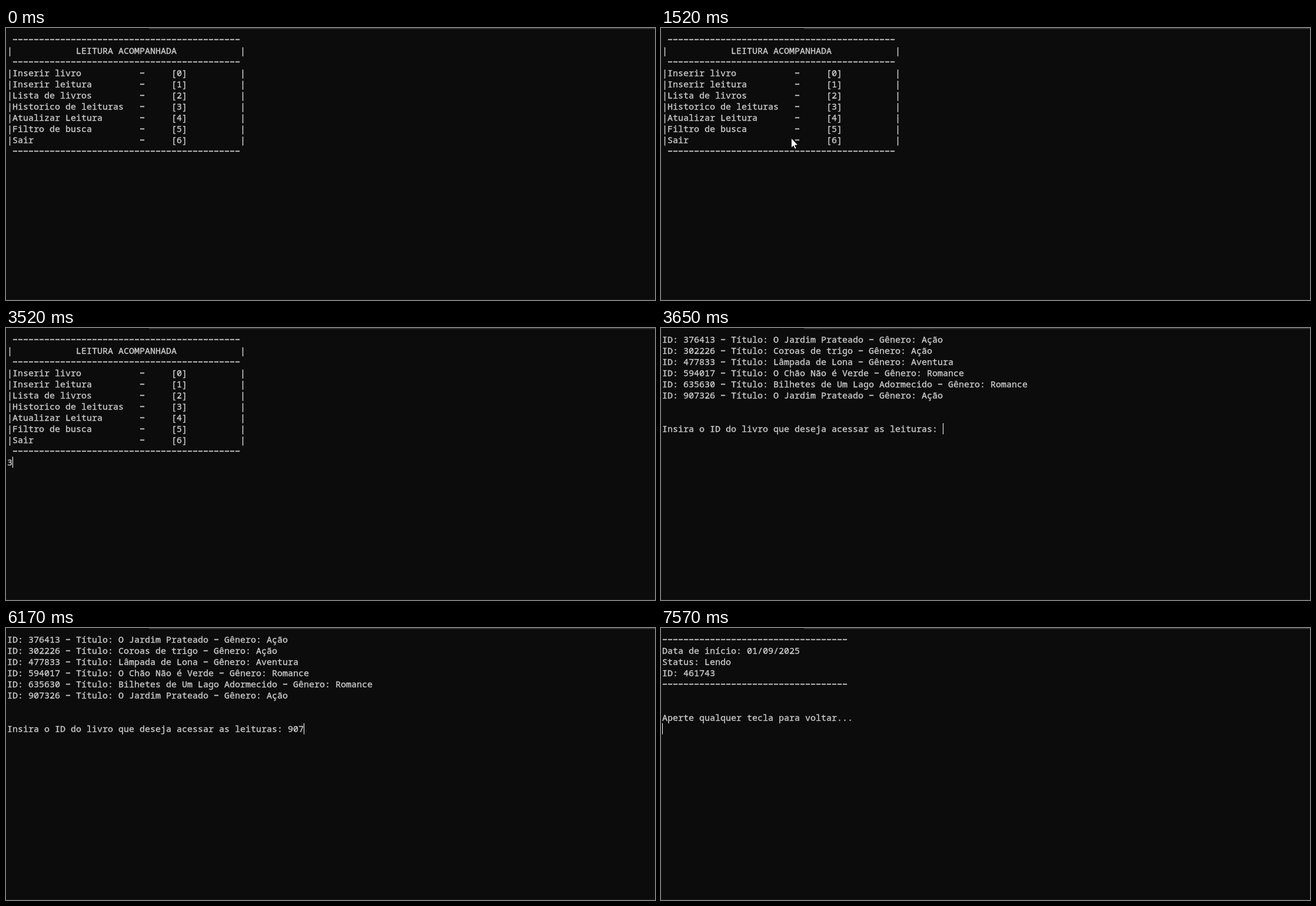
An HTML page for the animation above (8000 ms loop, 1103x463 px).

```html
<!DOCTYPE html>
<html lang="pt-BR">
<head>
<meta charset="utf-8">
<title>Leitura acompanhada</title>
<style>
html, body { margin: 0; width: 100%; height: 100%; overflow: hidden; background: #0c0c0c; }
body { position: relative; color: #ccc; }

.tab-edge { position: absolute; left: 243px; right: 0; top: 0; height: 2px; background: #2e2e2e; }
.bottom-edge { position: absolute; left: 0; right: 0; bottom: 0; height: 1px; background: #1a1a1a; }

pre {
  position: absolute; left: 2px; top: 10px; margin: 0;
  font: 15px/19px 'Noto Sans Mono', monospace;
  font-variant-ligatures: none;
  -webkit-text-stroke: .35px #ccc;
}
.typed { display: inline-block; width: 0; height: 19px; overflow: hidden; vertical-align: top; }
.caret { display: inline-block; width: 1px; height: 19px; margin-right: -1px; vertical-align: top; background: #fff; }
.pointer { position: absolute; left: 0; top: 0; width: 13px; height: 21px; overflow: visible; }

/* One 8 s clock for everything: 1% = 80 ms */
pre, .typed, .caret, .pointer { animation: 8s step-end infinite; }
#menu { animation-name: menu; }
#books { animation-name: books; }
#reading { animation-name: reading; }
#menu .typed { animation-name: choose; }
#menu .caret { animation-name: menu-blink; }
#books .typed { animation-name: type-id; }
#books .caret { animation-name: books-blink; }
.pointer { animation-name: point; }

@keyframes menu { 0% { visibility: visible } 45.625%, 100% { visibility: hidden } }
@keyframes books { 0%, 94.625%, 100% { visibility: hidden } 45.625% { visibility: visible } }
@keyframes reading { 0% { visibility: hidden } 94.625%, 100% { visibility: visible } }

@keyframes choose { 0% { width: 0 } 44%, 100% { width: 1ch } }
@keyframes menu-blink {
  0%, 15.75%, 29%, 43.125% { opacity: 0 }
  9.125%, 22.375%, 35.625%, 44%, 100% { opacity: 1 }
}
@keyframes type-id {
  0% { width: 0 }
  70.5% { width: 1ch }
  72.125% { width: 2ch }
  77.125% { width: 3ch }
  83.75% { width: 4ch }
  87.875% { width: 5ch }
  89.625%, 100% { width: 6ch }
}
@keyframes books-blink {
  0%, 59.75%, 70.5%, 100% { opacity: 1 }
  53.875%, 67.125% { opacity: 0 }
}
@keyframes point {
  0% { opacity: 0; transform: translate(925px, 430px) }
  1.625% { opacity: 1; transform: translate(925px, 430px); animation-timing-function: steps(6, jump-none) }
  6.62% { opacity: 1; transform: translate(138px, 230px) }
  6.625% { opacity: 0; transform: translate(138px, 230px) }
  9.875% { opacity: 1; transform: translate(212px, 221px) }
  15.75% { opacity: 1; transform: translate(216px, 227px); animation-timing-function: steps(4) }
  19% { opacity: 1; transform: translate(221px, 187px); animation-timing-function: steps(6) }
  23.25% { opacity: 1; transform: translate(471px, 0) }
  24%, 100% { opacity: 0; transform: translate(471px, 0) }
}
</style>
</head>
<body>
<div class="tab-edge"></div>
<div class="bottom-edge"></div>

<pre id="menu"> −−−−−−−−−−−−−−−−−−−−−−−−−−−−−−−−−−−−−−−−−−−
|            LEITURA ACOMPANHADA            |
 −−−−−−−−−−−−−−−−−−−−−−−−−−−−−−−−−−−−−−−−−−−
|Inserir livro           −     [0]          |
|Inserir leitura         −     [1]          |
|Lista de livros         −     [2]          |
|Historico de leituras   −     [3]          |
|Atualizar Leitura       −     [4]          |
|Filtro de busca         −     [5]          |
|Sair                    −     [6]          |
 −−−−−−−−−−−−−−−−−−−−−−−−−−−−−−−−−−−−−−−−−−−
<span class="typed">3</span><span class="caret"></span></pre>

<pre id="books">ID: 376413 − Título: O Jardim Prateado − Gênero: Ação
ID: 302226 − Título: Coroas de trigo − Gênero: Ação
ID: 477833 − Título: Lâmpada de Lona − Gênero: Aventura
ID: 594017 − Título: O Chão Não é Verde − Gênero: Romance
ID: 635630 − Título: Bilhetes de Um Lago Adormecido − Gênero: Romance
ID: 907326 − Título: O Jardim Prateado − Gênero: Ação


Insira o ID do livro que deseja acessar as leituras: <span class="typed">907326</span><span class="caret"></span></pre>

<pre id="reading">−−−−−−−−−−−−−−−−−−−−−−−−−−−−−−−−−−−
Data de início: 01/09/2025
Status: Lendo
ID: 461743
−−−−−−−−−−−−−−−−−−−−−−−−−−−−−−−−−−−


Aperte qualquer tecla para voltar...
<span class="caret"></span></pre>

<svg class="pointer" viewBox="0 0 13 21">
  <path d="M.5 .5V17L4.2 13.5 6.6 19 9 18 6.7 12.5H11.8Z" fill="#fff" stroke="#000" stroke-width=".8"/>
</svg>
</body>
</html>
```
